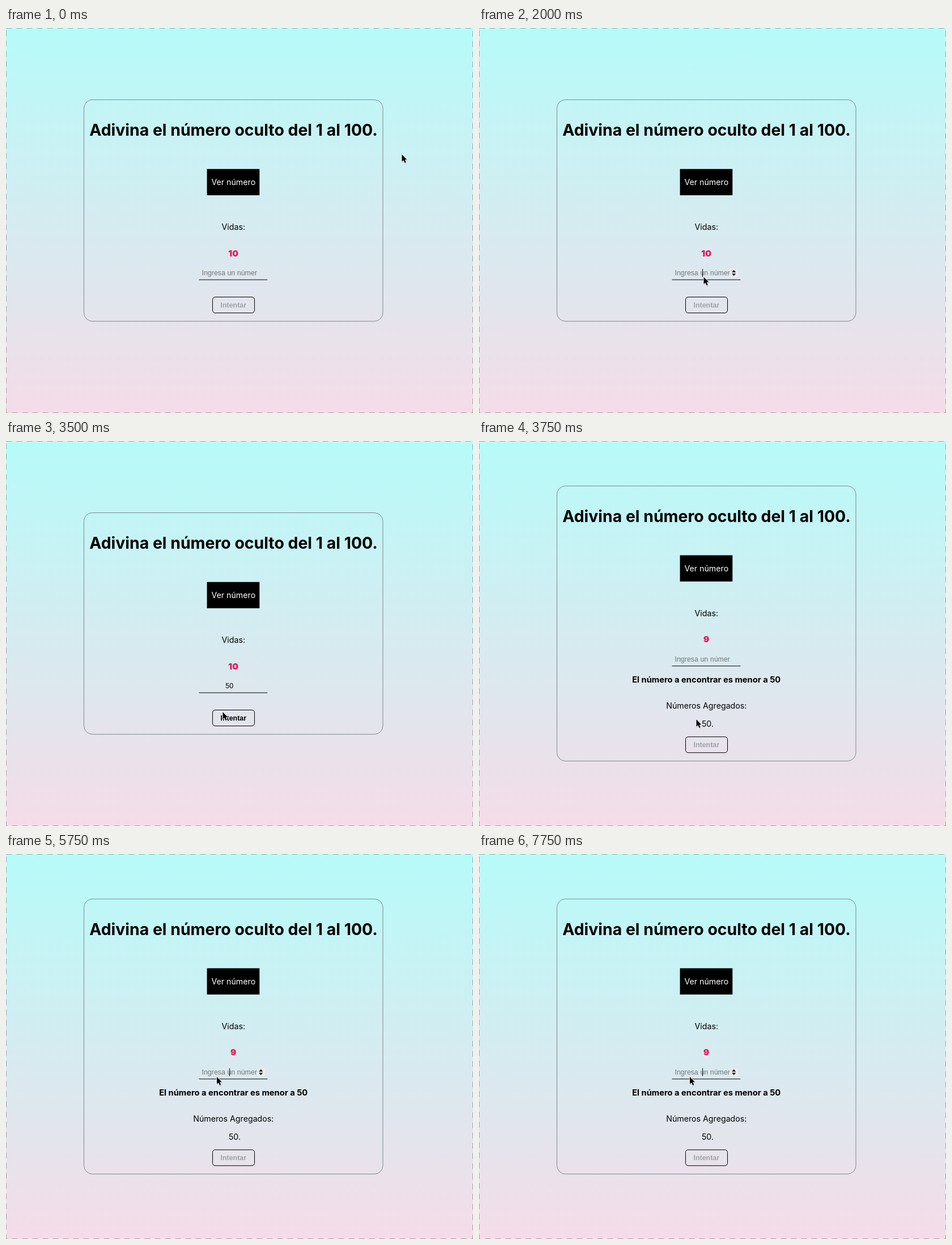
These frames come from a looping animation (824x679 px, 8 s). An HTML page:

```html
<!DOCTYPE html>
<html lang="es">
<head>
<meta charset="utf-8">
<title>Adivina el número</title>
<style>
  html, body { margin: 0; width: 100%; height: 100%; overflow: hidden; }
  svg { display: block; width: 824px; height: 679px; }
  text { font: 14.2px Inter, sans-serif; font-optical-sizing: none; text-anchor: middle; }
  .title { font-size: 28.4px; font-weight: 700; }
  .hint { font-size: 14.7px; font-weight: 700; }
  .lives { font-size: 15.2px; font-weight: 900; fill: #e8155f; }
  .control { font: 12.45px "Liberation Sans", Arial, sans-serif; }
  .placeholder { fill: #757575; text-anchor: start; }
  .bold { font-weight: 700; }
</style>
</head>
<body>
<svg viewBox="0 0 824 679">
  <defs>
    <linearGradient id="sky" x2="0" y2="1">
      <stop stop-color="#b6fbf9"/>
      <stop offset="1" stop-color="#f4dce8"/>
    </linearGradient>
  </defs>
  <rect width="824" height="679" fill="url(#sky)"/>
  <rect x=".5" y=".5" width="823" height="678" fill="none" stroke="#555" stroke-opacity=".45" stroke-dasharray="10 8"/>
  <rect id="card" x="137.5" width="527.5" rx="15" fill="none" stroke="#7f888c"/>

  <g id="upper">
    <text class="title" x="401.5" y="190">Adivina el número oculto del 1 al 100.</text>
    <rect x="354.6" y="248.7" width="92.7" height="46.3"/>
    <text x="401.3" y="277" fill="#fff">Ver número</text>
    <text x="401.3" y="356">Vidas:</text>
    <text class="lives" id="lives" x="401.2" y="402.6"></text>
    <text class="control placeholder" id="placeholder" x="345.5" y="436">Ingresa un númer</text>
    <text class="control" id="value" x="394.2" y="436"></text>
    <g id="spinner">
      <rect x="443.5" y="425" width="13.5" height="14" rx="2" fill="#efeff1" fill-opacity=".8"/>
      <path d="M446 431 449.7 426.8 453.4 431ZM446 433 449.7 437.2 453.4 433Z" fill="#222"/>
    </g>
    <rect id="caret" y="425" width="1" height="14"/>
    <path d="M340.5 444H461.3" stroke="#000"/>
  </g>

  <g id="result">
    <text class="hint" x="401.2" y="426">El número a encontrar es menor a 50</text>
    <text x="401.3" y="472">Números Agregados:</text>
    <text x="403.5" y="503.5">50.</text>
  </g>

  <g id="submit">
    <rect x="364.5" y="474.5" width="74" height="28" rx="4.5" fill="none" stroke="#000"/>
    <text class="control bold" id="label" x="401.3" y="493">Intentar</text>
  </g>

  <g id="cursor">
    <path d="M1 2V14.6L3.9 11.9 6.2 17 8.4 16 6.2 11H10Z" opacity=".15"/>
    <path d="M0 0V12.8L3 10.2 5.1 15 7.3 14 5.2 9.3H9Z" stroke="#fff" stroke-width="1.4" stroke-linejoin="round" paint-order="stroke"/>
  </g>
</svg>
<script>
const DURATION = 8000;
const STEP = 250;
const TYPING = 2250;
const KEY_DELAY = 500;
const BLUR = 3250;
const SUBMIT = 3750;
const REFOCUS = 5750;
const SHIFT = 47.2;

// Cursor glides: each one starts where the previous one ended.
const home = { x: 698.5, y: 223 };
const glides = [
  { start: 0, end: 1000, x: 396.5, y: 439 },
  { start: 3000, end: 3500, x: 382.5, y: 478 },
  { start: 3500, end: SUBMIT, x: 383.5, y: 491 },
  { start: SUBMIT, end: 4500, x: 317, y: 528 },
  { start: 4500, end: REFOCUS, x: 372, y: 393 }
];

const el = id => document.getElementById(id);
const clamp = (n, low, high) => Math.min(high, Math.max(low, n));
const easeOut = p => 1 - (1 - p) ** 2.5;
const show = (id, on) => el(id).setAttribute("visibility", on ? "visible" : "hidden");
const move = (id, x, y) => el(id).setAttribute("transform", `translate(${x} ${y})`);

function cursorAt(time) {
  return glides.reduce((from, { start, end, x, y }) => {
    const p = easeOut(clamp((time - start) / (end - start), 0, 1));
    return { x: from.x + (x - from.x) * p, y: from.y + (y - from.y) * p };
  }, home);
}

function typedAt(time) {
  if (time >= SUBMIT) return "";
  return "50".slice(0, clamp(Math.floor((time - TYPING) / KEY_DELAY) + 1, 0, 2));
}

// The blink restarts on focus and on every key.
function caretVisible(time, typed) {
  if (time < 1000 || (time >= BLUR && time < REFOCUS)) return false;
  const restart = time >= REFOCUS ? REFOCUS
    : typed ? TYPING + (typed.length - 1) * KEY_DELAY : 1000;
  return (time - restart) % 1000 < 500;
}

function draw(time) {
  const submitted = time >= SUBMIT;
  const shift = submitted ? SHIFT : 0;
  const typed = typedAt(time);
  const cursor = cursorAt(time);
  const inputY = cursor.y + shift;

  el("card").setAttribute("y", 126.5 - shift);
  el("card").setAttribute("height", 390.7 + 2 * shift);
  move("upper", 0, -shift);
  move("submit", 0, shift);
  move("cursor", cursor.x, cursor.y);

  el("lives").textContent = submitted ? "9" : "10";
  el("value").textContent = typed;
  el("label").setAttribute("fill", typed ? "#000" : "#a0a3a8");
  el("caret").setAttribute("x", 394 + typed.length * 3.6);
  show("placeholder", !typed);
  show("result", submitted);
  show("spinner", Math.abs(cursor.x - 401) < 60 && inputY > 420 && inputY < 444);
  show("caret", caretVisible(time, typed));
}

const start = performance.now();
function tick() {
  const time = (performance.now() - start) % DURATION;
  draw(Math.floor(time / STEP) * STEP);
  requestAnimationFrame(tick);
}
tick();
</script>
</body>
</html>
```
